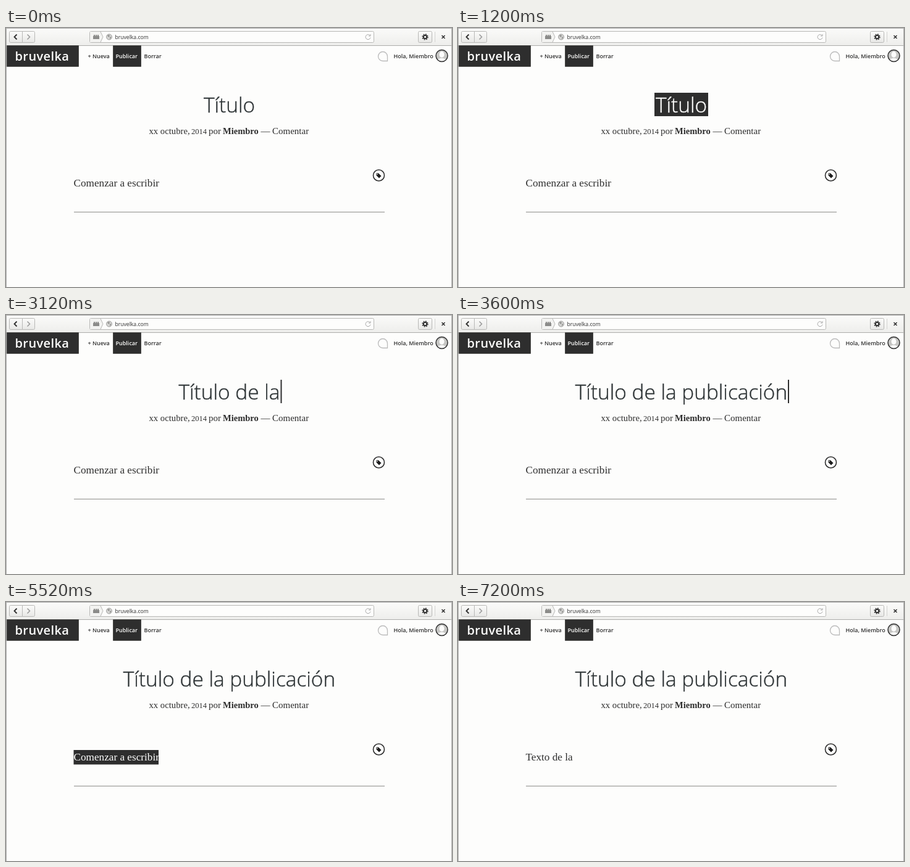
These frames come from a looping animation (722 by 420 pixels, 8000 ms). An HTML page:

```html
<!DOCTYPE html>
<html lang="es">
<head>
<meta charset="utf-8">
<title>Editor</title>
<style>
  html, body { margin: 0; width: 100%; height: 100%; overflow: hidden; background: #fdfdfc; }
  svg { display: block; width: 722px; height: 420px; }
  text { font-family: "Open Sans", "Noto Sans", sans-serif; fill: #2e2e2e; white-space: pre; }
  .nav { font-size: 9px; font-weight: 600; }
  .serif text { font: 15px "Liberation Serif", serif; }
  .serif #body { font-size: 17.2px; }
  #title { font-size: 33.4px; font-weight: 300; text-anchor: middle; fill: #2e3436; stroke: #2e3436; stroke-width: .45; }
  #title.on { fill: #fdfdfc; stroke: #fdfdfc; }
  .serif #body.on, .light { fill: #fdfdfc; }
  .line { fill: none; stroke: #2e2e2e; }
</style>
</head>
<body>
<svg viewBox="0 0 722 420">
  <defs>
    <linearGradient id="bar" x2="0" y2="1">
      <stop stop-color="#fbfbfa"/><stop offset="1" stop-color="#eeeeec"/>
    </linearGradient>
    <linearGradient id="button" x2="0" y2="1">
      <stop stop-color="#fbfbfa"/><stop offset="1" stop-color="#e8e8e6"/>
    </linearGradient>
    <clipPath id="round"><circle cx="705.5" cy="45" r="9"/></clipPath>
  </defs>

  <!-- Browser bar -->
  <rect width="722" height="28" fill="url(#bar)"/>
  <path class="line" d="M0 .5H722M.5 0V420M721.5 0V420M0 28.5H722" style="stroke:#adadab"/>
  <g stroke="#b8b8b6" fill="url(#button)">
    <rect x="5.5" y="5.5" width="41" height="18" rx="2"/>
    <path d="M26.5 6V23"/>
    <rect x="667.5" y="5.5" width="22" height="18" rx="2"/>
    <rect x="135.5" y="5.5" width="460" height="18" rx="2" fill="#fdfdfc"/>
    <path d="M136 6H153L157 14.5L153 23H136Z" fill="#f3f3f1" stroke="none"/>
    <path d="M153 6L157 14.5L153 23" fill="none"/>
    <path d="M694.5 6V23" stroke="#d4d4d2"/>
  </g>
  <path class="line" d="M17.5 10.5L13.5 14.5L17.5 18.5" stroke-width="1.8"/>
  <path class="line" d="M34.5 10.5L38.5 14.5L34.5 18.5" stroke-width="1.5" style="stroke:#999"/>
  <path d="M141 13H142V11H144V13H145V11H147V13H148V11H150V13H151V18H141Z" fill="#8b8b89"/>
  <circle cx="167" cy="14.5" r="4.5" fill="#d5d5d3" stroke="#a0a09e"/>
  <path d="M164 12l3-1 1 2-2 2zM168 15l2-1 0 2-2 2z" fill="#929290"/>
  <text x="176.5" y="17.5" font-size="8.6" font-weight="500">bruvelka.com</text>
  <path class="line" d="M589.5 12.5A4 4 0 1 0 590 15.5M590 10V13H587" style="stroke:#aaa"/>
  <circle class="line" cx="678.5" cy="14.5" r="2.8" stroke-width="2"/>
  <circle class="line" cx="678.5" cy="14.5" r="4.5" stroke-width="1.4" stroke-dasharray="1.7 1.834"/>
  <path class="line" d="M705.5 12L710.5 17M710.5 12L705.5 17" stroke-width="1.5"/>

  <!-- Site header -->
  <path d="M1.5 28.5H117.5V62.5H1.5ZM173.5 28.5H218.5V62.5H173.5Z" fill="#2e2e2e" stroke="#4c4c4a"/>
  <text class="light" x="14.5" y="53" font-size="20" font-weight="600" letter-spacing=".4">bruvelka</text>
  <g class="nav">
    <text x="132.5" y="49">+ Nueva</text>
    <text class="light" x="177.5" y="49">Publicar</text>
    <text x="223.5" y="49">Borrar</text>
    <text x="627.5" y="49">Hola, Miembro</text>
  </g>
  <path class="line" d="M610 53.5A7.5 7.5 0 1 1 617.5 46V53.5Z" stroke-width="1.3" style="stroke:#bbb"/>
  <g clip-path="url(#round)" fill="#fdfdfc">
    <rect x="695" y="35" width="21" height="21" fill="#c6c6c4"/>
    <ellipse cx="705.5" cy="43" rx="4" ry="5"/>
    <ellipse cx="705.5" cy="54" rx="8" ry="5"/>
  </g>
  <circle class="line" cx="705.5" cy="45" r="9.5" stroke-width="1.5"/>

  <!-- Post -->
  <rect id="mark" fill="#2e2e2e"/>
  <text id="title" x="361.5" y="137"></text>
  <rect id="caret" y="105" width="2" height="38" fill="#2e2e2e"/>
  <g class="serif">
    <text y="172"><tspan x="231.5" font-size="14.7">xx octubre,</tspan><tspan x="300" font-size="12.5">2014</tspan><tspan
      x="328">por</tspan><tspan x="351" font-weight="bold" font-size="14.5">Miembro</tspan><tspan
      x="412.5">—</tspan><tspan x="431">Comentar</tspan></text>
    <text id="body" x="109.5" y="256.5"></text>
  </g>
  <circle class="line" cx="603.5" cy="239" r="9" stroke-width="1.6"/>
  <path d="M599.5 235.5H603L607.5 240L604 243.5L599.5 239ZM601 236.4a.8 .8 0 1 0 .1 0Z" fill="#1c1c1c" fill-rule="evenodd"/>
  <path class="line" d="M110 298.5H613" style="stroke:#8c8c8a"/>
</svg>
<script>
const $ = id => document.getElementById(id);
const STEP = 1200, LOOP = 8000;
const prompt = "Comenzar a escribir", full = "Título de la publicación";
const steps = [
  { title: "Título", body: prompt },
  { title: "Título", body: prompt, mark: "title" },
  { title: "Título de la", body: prompt, caret: 444.5 },
  { title: full, body: prompt, caret: 534 },
  { title: full, body: prompt, mark: "body" },
  { title: full, body: "Texto" },
  { title: full, body: "Texto de la" }
];
const boxes = { title: [318, 105, 87, 38], body: [109.5, 240, 137.5, 23.5] };
let shown;

function show({ title, body, mark, caret }) {
  $("title").textContent = title;
  $("body").textContent = body;
  for (const id in boxes) $(id).classList.toggle("on", id === mark);
  const box = boxes[mark] || [0, 0, 0, 0];
  ["x", "y", "width", "height"].forEach((name, i) => $("mark").setAttribute(name, box[i]));
  $("caret").setAttribute("x", caret || -9);
}

function draw() {
  const step = steps[Math.floor(performance.now() % LOOP / STEP)];
  if (step !== shown) show(shown = step);
  requestAnimationFrame(draw);
}
draw();
</script>
</body>
</html>
```
